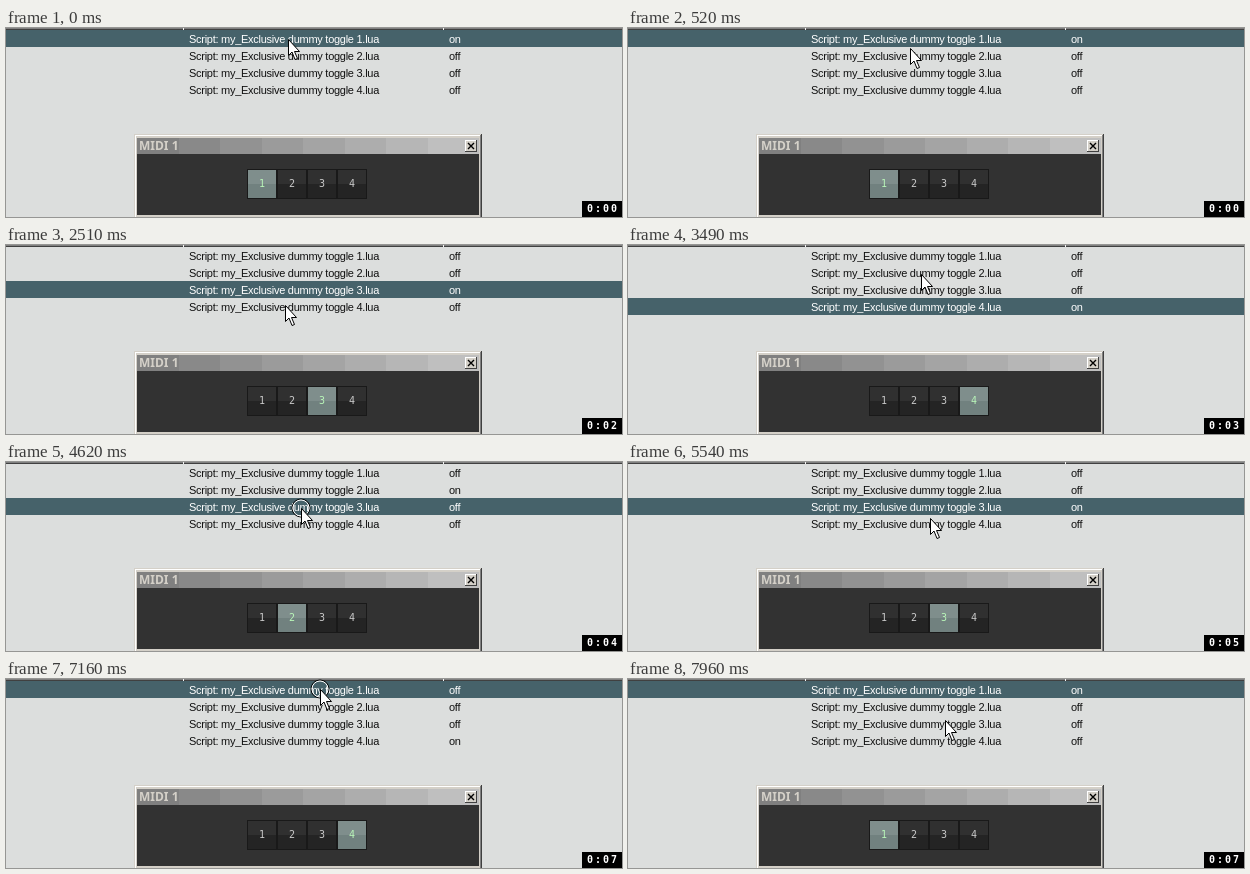
Write an HTML page that moves like this. It is 616 by 189 pixels and loops after 8000 ms.

```html
<!DOCTYPE html>
<html>
<head>
<meta charset="utf-8">
<style>
html, body { margin: 0; width: 100%; height: 100%; overflow: hidden; background: #dcdedd; }
svg { display: block; }
.row { font: 11px "Liberation Sans", Arial, sans-serif; letter-spacing: -.27px; white-space: pre; }
.title { font: bold 12px "Noto Sans", sans-serif; fill: #d4d0c8; }
.num { font: 10px "DejaVu Sans Mono", monospace; text-anchor: middle; }
.clock { font: bold 10px "DejaVu Sans Mono", monospace; letter-spacing: 2px; fill: #fff; }
</style>
</head>
<body>
<svg id="stage" width="616" height="189" viewBox="0 0 616 189"></svg>
<script>
const LOOP = 8000;
// Screen refreshes: first, last, count
const bursts = [[280, 1260, 8], [1380, 2360, 8], [2510, 2630, 2], [2910, 3030, 2], [3340, 3490, 2],
  [3800, 4100, 3], [4380, 5110, 7], [5390, 6310, 7], [6590, 7260, 6], [7570, 7960, 4]];
// Pointer path: time, x, y
const path = [[140, 282, 11], [700, 281, 28], [1120, 281, 28], [1520, 279, 41], [1660, 279, 44],
  [2100, 279, 44], [2510, 279, 60], [3200, 279, 60], [3490, 293, 29], [4250, 293, 29], [4620, 295, 46],
  [5250, 295, 46], [5700, 306, 61], [6450, 306, 61], [6990, 314, 10], [7570, 314, 10], [7960, 317, 41]];
// Clicks: press, script switched on, row
const clicks = [[0, 0, 0], [700, 980, 1], [1660, 1940, 2], [2630, 2910, 3], [3800, 3950, 1],
  [4620, 4870, 2], [5700, 6000, 3], [6990, 7570, 0]];

const stage = document.getElementById("stage");
function add(tag, attrs, text = "", parent = stage) {
  const el = document.createElementNS("http://www.w3.org/2000/svg", tag);
  for (const k in attrs) el.setAttribute(k, attrs[k]);
  el.textContent = text;
  return parent.appendChild(el);
}
const rect = (x, y, width, height, fill) => add("rect", { x, y, width, height, fill });
const label = (x, y, cls, text) => add("text", { x, y, class: cls }, text);

// Script list
rect(0, 0, 616, 1, "#808080");
rect(0, 1, 616, 1, "#404040");
for (const x of [177, 437]) rect(x, 0, 1, 2, "#f4f4f4");
const bar = rect(0, 2, 616, 17, "#46626a");
const rows = [0, 1, 2, 3].map(i => [
  label(183, 15 + 17 * i, "row", `Script: my_Exclusive dummy toggle ${i + 1}.lua`),
  label(443, 15 + 17 * i, "row", "off")
]);

// Toolbar window
rect(128, 106, 348, 83, "#404040");
rect(128, 106, 347, 83, "#d4d0c8");
rect(129, 107, 345, 1, "#fff");
rect(129, 107, 1, 82, "#fff");
rect(474, 107, 1, 82, "#808080");
for (let i = 0; i < 8; i++) {
  const x = Math.round(131 + 41.5 * i), v = 128 + 9 * i;
  rect(x, 110, 473 - x, 16, `rgb(${v},${v},${v})`);
}
label(133, 122, "title", "MIDI 1");
rect(459, 112, 12, 12, "#404040");
rect(459, 112, 11, 11, "#fff");
rect(460, 113, 10, 10, "#d4d0c8");
add("path", { d: "M462 115l6 6m0-6l-6 6", stroke: "#000", "stroke-width": 1.4 });
rect(131, 126, 342, 61, "#323232");
const buttons = [0, 1, 2, 3].map(i => {
  const x = 241 + 30 * i;
  rect(x, 141, 30, 30, "#191919");
  return [rect(x + 1, 142, 28, 14), rect(x + 1, 156, 28, 14), label(x + 15, 159, "num", i + 1)];
});

// Clock and pointer
rect(576, 173, 40, 16, "#000");
const clock = label(581, 184, "clock", "");
const pointer = add("g", {});
const ring = add("g", { fill: "none" }, "", pointer);
add("circle", { r: 9, stroke: "#000" }, "", ring);
add("circle", { r: 8, stroke: "#fff" }, "", ring);
add("path", {
  d: "M.5.5V16.5L4 13L7 20.5L9.5 19.5L6.5 12.5H11.5Z", fill: "#fff", stroke: "#000"
}, "", pointer);

function lastRefresh(t) {
  let last = 0;
  for (const [a, b, n] of bursts)
    for (let i = 0; i < n; i++) {
      const s = Math.round((a + (b - a) * i / (n - 1)) / 10) * 10;
      if (s <= t) last = s;
    }
  return last;
}

function pointerAt(t) {
  const i = path.findIndex(p => p[0] >= t);
  if (i <= 0) return path[i < 0 ? path.length - 1 : 0].slice(1);
  const a = path[i - 1], b = path[i], k = (t - a[0]) / (b[0] - a[0]);
  return [1, 2].map(j => Math.round(a[j] + (b[j] - a[j]) * k));
}

function draw(now) {
  const t = lastRefresh(now % LOOP);
  const click = clicks.filter(c => c[0] <= t).pop();
  const sel = click[2], on = clicks.filter(c => c[1] <= t).pop()[2];
  bar.setAttribute("y", 2 + 17 * sel);
  rows.forEach(([name, state], i) => {
    for (const el of [name, state]) el.setAttribute("fill", i === sel ? "#fff" : "#111");
    state.textContent = i === on ? "on" : "off";
  });
  buttons.forEach(([top, bottom, num], i) => {
    const lit = i === on;
    top.setAttribute("fill", lit ? "#7f8e8c" : "#303030");
    bottom.setAttribute("fill", lit ? "#71817f" : "#242424");
    num.setAttribute("fill", lit ? "#b8f5b8" : "#c8c8c8");
  });
  clock.textContent = "0:0" + Math.floor(t / 1000);
  pointer.setAttribute("transform", `translate(${pointerAt(t)})`);
  ring.setAttribute("visibility", t < click[1] ? "visible" : "hidden");
  requestAnimationFrame(frame);
}

let start;
function frame(now) {
  start ??= now;
  draw(now - start);
}
draw(0);
</script>
</body>
</html>
```
